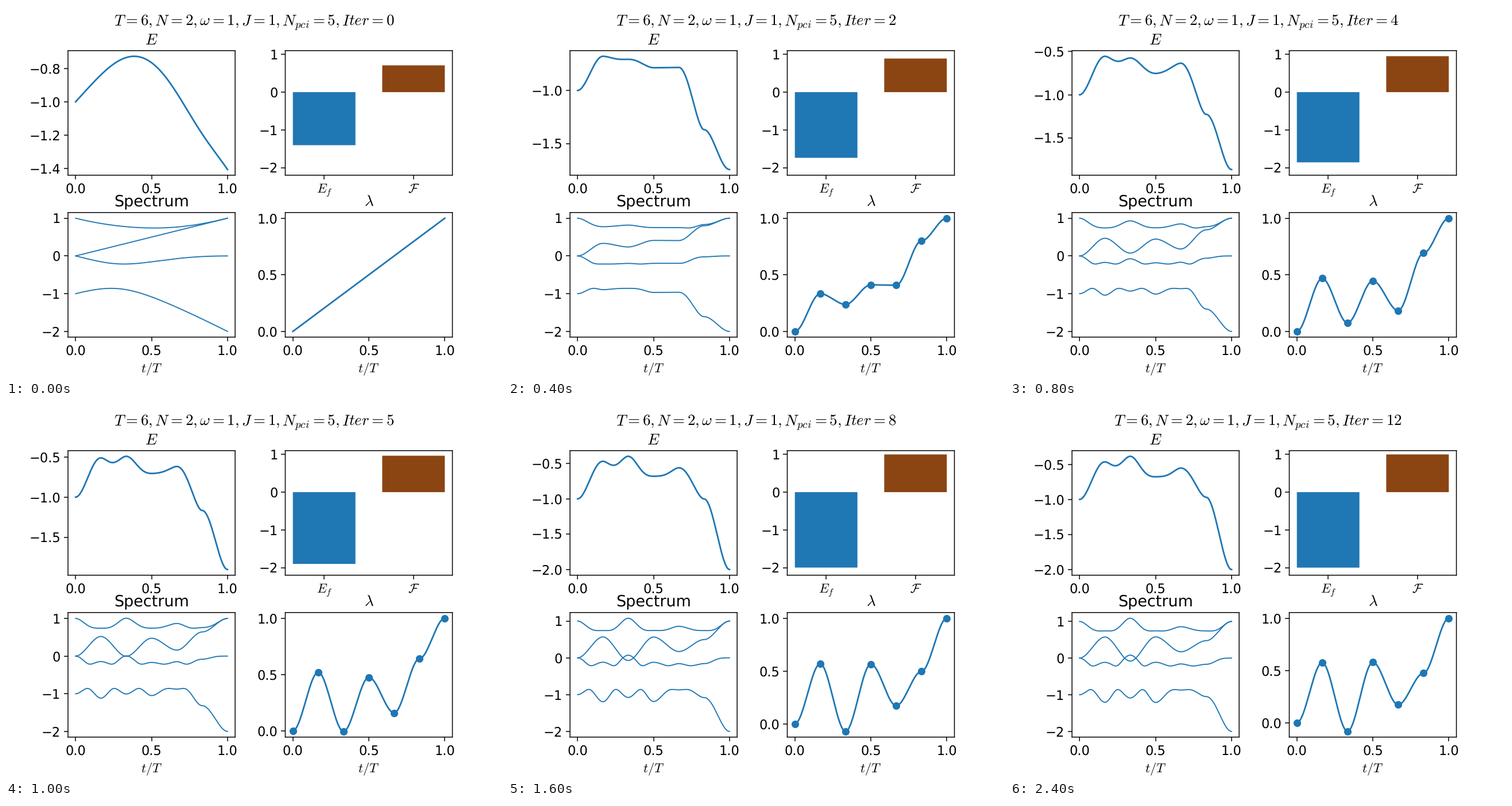
These frames come from a looping animation (864 by 648 pixels, 2600 ms). A matplotlib script:

```python
import numpy as np
import matplotlib.pyplot as plt
from matplotlib.animation import FuncAnimation

plt.rcParams.update({
    "font.family": "DejaVu Sans",
    "font.size": 12,
    "mathtext.fontset": "cm",
    "text.hinting": "none",
    "path.snap": False,
})

# Two coupled spins, annealed from a transverse field to an Ising Hamiltonian
T, STEPS, SEGMENTS, ITERATIONS = 6, 600, 6, 13
s = np.linspace(0, 1, STEPS + 1)
H_START = -np.array([[0, 1, 0], [1, 0, 1], [0, 1, 0]]) / np.sqrt(2)
H_FINAL = np.diag([-2.0, 1.0, 0.0])

# Key poses of the inner schedule nodes
FIRST = np.array([0.25, 0.32, 0.404, 0.606, 0.859])
EARLY = np.array([0.416, 0.157, 0.419, 0.209, 0.742])
LATE = np.array([0.521, -0.006, 0.475, 0.159, 0.641])
BEST = np.array([0.576, -0.082, 0.579, 0.173, 0.475])


def inner_nodes(iteration):
    """Search in straight legs up to iteration 5, then settle on the optimum."""
    if iteration <= 3:
        return FIRST + (EARLY - FIRST) * (iteration - 1) / 2
    if iteration <= 5:
        return EARLY + (LATE - EARLY) * (iteration - 3) / 2
    return BEST + (LATE - BEST) * np.exp(-((iteration - 5) / 2.1) ** 2)


def schedule(iteration, x):
    """Linear ramp at first, then cubic pieces that are flat at every node."""
    if iteration == 0:
        return x
    nodes = np.array([0, *inner_nodes(iteration), 1])
    k = np.minimum((x * SEGMENTS).astype(int), SEGMENTS - 1)
    u = x * SEGMENTS - k
    return nodes[k] + (nodes[k + 1] - nodes[k]) * u * u * (3 - 2 * u)


def hamiltonian(lam):
    lam = lam[:, None, None]
    return (1 - lam) * H_START + lam * H_FINAL


def evolve(iteration):
    """Return schedule, spectrum, mean energy and final fidelity."""
    lam = schedule(iteration, s)
    h = hamiltonian(lam)
    levels = np.column_stack([np.linalg.eigvalsh(h), lam])

    midpoints = (s[1:] + s[:-1]) / 2
    values, vectors = np.linalg.eigh(hamiltonian(schedule(iteration, midpoints)))
    phases = np.exp(-1j * values * T / STEPS)
    propagators = (vectors * phases[:, None, :]) @ vectors.transpose(0, 2, 1)

    psi = [np.array([0.5, np.sqrt(0.5), 0.5], dtype=complex)]
    for step in propagators:
        psi.append(step @ psi[-1])
    psi = np.array(psi)
    energy = np.einsum("ti,tij,tj->t", psi.conj(), h, psi).real
    return lam, levels, energy, abs(psi[-1, 0]) ** 2


runs = [evolve(i) for i in range(ITERATIONS)]

fig, axes = plt.subplots(2, 2, figsize=(6.4, 4.8), dpi=135)
fig.subplots_adjust(left=0.125, right=0.9, bottom=0.11, top=0.88, wspace=0.3, hspace=0.3)
(ax_energy, ax_bars), (ax_levels, ax_lam) = axes
header = fig.suptitle("")

ax_energy.set_title("$E$")
ax_levels.set_title("Spectrum")
ax_lam.set_title(r"$\lambda$")
for ax in (ax_levels, ax_lam):
    ax.set_xlabel("$t/T$")

energy_line, = ax_energy.plot(s, s, lw=1.5)
level_lines = [ax_levels.plot(s, s, color="C0", lw=1)[0] for _ in range(4)]
lam_line, = ax_lam.plot(s, s, lw=1.5, ms=6, markevery=STEPS // SEGMENTS)
bars = ax_bars.bar([0, 1], [-1, 1], width=0.7, color=["C0", "saddlebrown"])
ax_bars.set_xticks([0, 1], ["$E_f$", r"$\mathcal{F}$"])
ax_bars.set_ylim(-2.2, 1.1)


def update(i):
    lam, levels, energy, fidelity = runs[i]
    header.set_text(rf"$T=6, N=2, \omega=1, J=1, N_{{pci}}=5, Iter={i}$")
    energy_line.set_ydata(energy)
    for line, level in zip(level_lines, levels.T):
        line.set_ydata(level)
    lam_line.set_ydata(lam)
    lam_line.set_marker("o" if i else "None")
    bars[0].set_height(energy[-1])
    bars[1].set_height(fidelity)
    for ax in (ax_energy, ax_levels, ax_lam):
        ax.relim()
        ax.autoscale_view()
    return []


anim = FuncAnimation(fig, update, frames=ITERATIONS, interval=200, repeat=True, repeat_delay=0)
plt.show()
```
